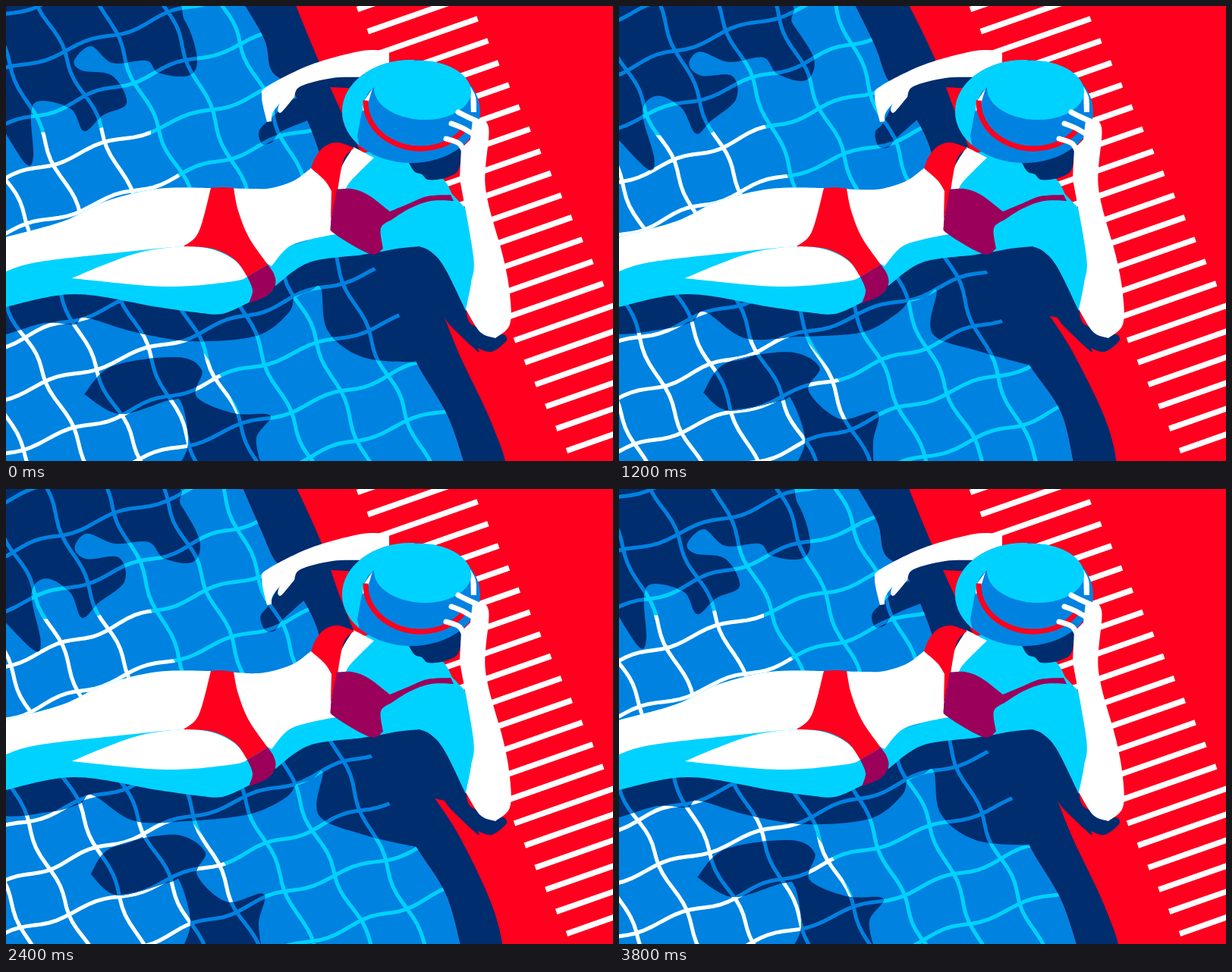
Recreate the animation shown at these times as an HTML page with a canvas. Size 800 by 600 pixels, loop 3.84 s.

```html
<!DOCTYPE html>
<html lang="en">
<head>
<meta charset="utf-8">
<title>Poolside</title>
<style>
  html, body { margin: 0; width: 100%; height: 100%; overflow: hidden; background: #ff001e; }
  canvas { display: block; }
</style>
</head>
<body>
<canvas id="stage" width="800" height="600"></canvas>
<script>
const ctx = document.getElementById('stage').getContext('2d');
const RED = '#ff001e', NAVY = '#002d6e', BLUE = '#0082e1', CYAN = '#00d2ff', PLUM = '#9b005a', WHITE = '#fff';
const LOOP = 3840, STEP = 40, TURN = 1900, TAU = Math.PI * 2;

// Outlines are a few key points joined by smooth runs; a bar marks a corner.
const POOL_EDGE = '312 -6 341 45 350 85 378 112 412 190 440 300 486 346 517 405 540 468 582 540 606 610';
const DECK_EDGE = '657 612 640 550 600 465 578 411 | 520 300 | 447 150 412 72 379 -8';
const WHITE_ZONE = '-20 170 | 118 163 | 191 140 | 191 172 | 240 240 | 240 430 | 283 488 | 345 620 | -20 620';

const WATER_SHADOWS = [
  POOL_EDGE + '|' + DECK_EDGE,
  // upper left patch
  '-20 -20 | 200 -14 236 20 252 70 240 92 201 88 185 72 140 75 112 53 90 72 100 85 140 92 159 128 128 144 103 165 86 136 47 125 33 140 36 198 26 208 -4 162',
  // lower patch
  '103 512 140 475 225 463 258 480 251 515 300 537 348 540 330 570 338 612 | 224 612 | 240 578 232 525 215 520 150 538 103 512',
  // cast by the body
  '-20 380 | -20 434 50 418 90 420 105 411 170 430 245 442 330 435 372 405 379 383 | 400 376 415 372 424 428 470 463 545 470 | 560 320 | 200 350',
  // cast by the hand
  '400 120 | 376 124 352 146 334 164 337 181 350 180 362 166 400 150'
];
const DECK_SHADOWS = [
  '470 320 | 545 312 | 580 335 606 395 | 614 420 658 434 | 659 442 640 456 622 451 | 621 455 588 424 578 411 | 530 400',
  '385 108 | 400 92 | 476 88 | 470 109 | 425 107'
];

const LEGS = '-5 306 75 284 130 258 200 241 275 240 | 330 320 | 352 366 342 382 320 391 | 285 406 250 404 200 397 90 380 -5 398';
const UPPER_LEG = '-5 306 75 284 130 258 200 241 275 240 | 275 318 | 235 317 150 325 40 338 -5 352';
const LOWER_LEG = '87 359 130 341 180 324 235 317 272 321 301 335 319 356 | 300 363 210 370 87 359';
const TORSO = '285 240 325 241 350 240 380 230 404 212 | 435 230 | 440 300 | 400 308 372 318 350 343 | 320 325';
const FLANK = '335 343 | 356 330 372 318 400 308 430 294 | 455 300 | 497 322 | 470 328 400 338 355 369';
const BRIEFS = '270 240 285 239 300 240 | 306 270 320 305 345 341 | 318 357 | 302 335 272 320 234 317 | 254 298 270 240';
const BRIEFS_SHADE = '318 357 345 341 | 353 353 355 367 344 382 320 392 | 325 375 318 357';
const BACK = '434 246 | 450 200 | 485 190 | 530 195 | 574 226 588 248 | 618 280 | 620 360 | 606 402 | 578 345 560 324 545 317 | 515 320 480 327';
const CHEST = '437 241 441 215 458 186 | 485 200 | 455 230 448 241';
const CUP_LEFT = '402 214 408 199 420 185 437 180 459 187 | 445 203 437 244 | 428 282 | 429 244 | 420 230 402 214';
const CUP_RIGHT = '436 242 455 241 477 249 506 271 | 530 261 555 251 586 249 | 590 257 | 560 257 532 267 508 282 | 494 293 497 320 | 480 327 434 301 428 287 436 242';
const ARM_LEFT = '505 60 470 59 403 77 346 105 337 119 344 153 | 350 152 | 352 140 368 120 | 360 130 358 138 | 363 140 380 120 | 388 106 430 95 474 94 | 505 82';
const ARM_RIGHT = '615 150 636 160 632 240 655 330 664 380 664 420 645 438 | 625 430 606 400 | 613 365 616 330 598 228 | 600 188 | 612 176';
const FINGERS = ['596 140 610 147 630 156', '587 155 602 161 624 174', '580 175 598 182 607 200'];
const HAIR = '529 203 538 218 548 222 556 229 574 228 592 221 598 212 | 602 185 | 560 190';
const BRIM_LIT = '440 60 | 550 60 | 520 90 | 484 108 472 128 463 172 | 467 190 | 440 200';
const GLINTS = ['483 109 472 126 470 139 | 476 131 483 109', '612 106 619 120 620 140 | 613 140 | 612 106'];

const still = (x, y) => [x, y];

function trace(text, move = still) {
  const path = new Path2D();
  let last = null;
  for (const part of text.split('|')) {
    const nums = part.trim().split(/\s+/).map(Number);
    const run = last ? [last] : [];
    for (let i = 0; i < nums.length; i += 2) run.push(move(nums[i], nums[i + 1]));
    if (!last) path.moveTo(...run[0]);
    for (let i = 0; i < run.length - 1; i++) {
      const a = run[i - 1] || run[i], b = run[i], c = run[i + 1], d = run[i + 2] || c;
      path.bezierCurveTo(b[0] + (c[0] - a[0]) / 6, b[1] + (c[1] - a[1]) / 6,
        c[0] - (d[0] - b[0]) / 6, c[1] - (d[1] - b[1]) / 6, c[0], c[1]);
    }
    last = run[run.length - 1];
  }
  return path;
}

function ellipse(x, y, rx, ry, turn = 0, from = 0, to = TAU) {
  const path = new Path2D();
  path.ellipse(x, y, rx, ry, turn, from, to);
  return path;
}

function fill(path, color) {
  ctx.fillStyle = color;
  ctx.fill(path);
}

function stroke(path, color, width) {
  ctx.strokeStyle = color;
  ctx.lineWidth = width;
  ctx.stroke(path);
}

function within(path, draw) {
  ctx.save();
  ctx.clip(path);
  draw();
  ctx.restore();
}

// Rippling of the tiles: each axis carries a wave about one tile long.
function ripple(x, y, phase) {
  const row = (y + 0.345 * x - 85) / 72;
  return [
    -4 * Math.cos(TAU * ((y - 105) / 102 + x / 1000) - phase),
    -4 * Math.cos(TAU * (x - 105 - 12 * row) / 110 + phase)
  ];
}

// Slow refraction on top of the ripple; it fades towards the lower edge.
function drift(x, y, amount) {
  return amount * (6 - x / 32) * (1 - (y / 600) ** 6);
}

function tileGrid(place) {
  const grid = new Path2D();
  const line = at => {
    for (let s = -20; s <= 620; s += 10) grid[s === -20 ? 'moveTo' : 'lineTo'](...place(...at(s)));
  };
  for (let k = -3; k <= 4; k++) line(y => [80 * k - 33 + (0.48 - 0.009 * k) * y, y]);
  for (let j = -1; j <= 9; j++) line(x => [x, 85 + 72 * j - 0.345 * x]);
  return grid;
}

function drawDeck() {
  ctx.fillStyle = RED;
  ctx.fillRect(0, 0, 800, 600);
  const stripes = new Path2D();
  for (let i = 0; i < 21; i++) {
    const x = 463 + 13.8 * i, y = 4.5 + 29.1 * i;
    stripes.moveTo(x, y);
    stripes.lineTo(x + 131, y - 46);
  }
  ctx.lineCap = 'butt';
  stroke(stripes, WHITE, 7.5);
}

function drawWater(swing) {
  const phase = 0.00274 * TURN * swing;
  const place = (x, y) => {
    const [dx, dy] = ripple(x, y, phase);
    return [x + dx + drift(x, y, swing), y + dy];
  };
  // Shadows are outlined at rest, so only the change of the ripple moves them.
  const sway = (x, y) => {
    const [px, py] = place(x, y), [rx, ry] = ripple(x, y, 0);
    return [px - rx, py - ry];
  };
  const pool = trace(POOL_EDGE + '| -20 610 | -20 -20', sway);
  const grid = tileGrid(place);
  const shadows = [
    ...WATER_SHADOWS.map(shape => trace(shape, sway)),
    ...DECK_SHADOWS.map(shape => trace(shape))
  ];

  fill(pool, BLUE);
  within(pool, () => {
    stroke(grid, CYAN, 5);
    within(trace(WHITE_ZONE, sway), () => stroke(grid, WHITE, 5));
  });
  for (const shadow of shadows) fill(shadow, NAVY);
  within(pool, () => {
    for (const shadow of shadows) within(shadow, () => stroke(grid, BLUE, 5));
  });
}

function drawBody(swing) {
  // The waterline laps over the waist as the water swings out.
  const lap = (x, y) => [x, y < 250 ? y + 6 * swing ** 3 * Math.exp(-(((x - 318) / 22) ** 2)) : y];
  fill(trace(LEGS, lap), CYAN);
  fill(trace(UPPER_LEG), WHITE);
  fill(trace(LOWER_LEG), WHITE);
  fill(trace(FLANK), CYAN);
  fill(trace(TORSO, lap), WHITE);
  fill(trace(BRIEFS, lap), RED);
  fill(trace(BRIEFS_SHADE), PLUM);
  fill(trace(BACK), CYAN);
  fill(trace(CHEST), WHITE);
  fill(trace(CUP_LEFT), RED);
  fill(trace(CUP_RIGHT), PLUM);
  fill(trace(ARM_LEFT), WHITE);
}

function drawHat() {
  const brim = ellipse(534, 139, 91, 68);
  fill(trace(HAIR), NAVY);
  fill(brim, BLUE);
  within(brim, () => fill(trace(BRIM_LIT), CYAN));
  for (const glint of GLINTS) fill(trace(glint), WHITE);
  stroke(ellipse(545, 128, 71, 60, 0.05, 0.55, Math.PI), RED, 7);
  fill(ellipse(549, 111, 64, 39, 0.05), CYAN);
}

function drawRaisedArm() {
  fill(trace(ARM_RIGHT), WHITE);
  ctx.lineCap = 'round';
  for (const finger of FINGERS) stroke(trace(finger), WHITE, 7);
}

const start = performance.now();

function frame() {
  const elapsed = (performance.now() - start) % LOOP;
  const time = Math.floor(elapsed / STEP) * STEP;
  const swing = 1 - Math.abs(time - TURN) / TURN;
  drawDeck();
  drawWater(swing);
  drawBody(swing);
  drawHat();
  drawRaisedArm();
  requestAnimationFrame(frame);
}

frame();
</script>
</body>
</html>
```
